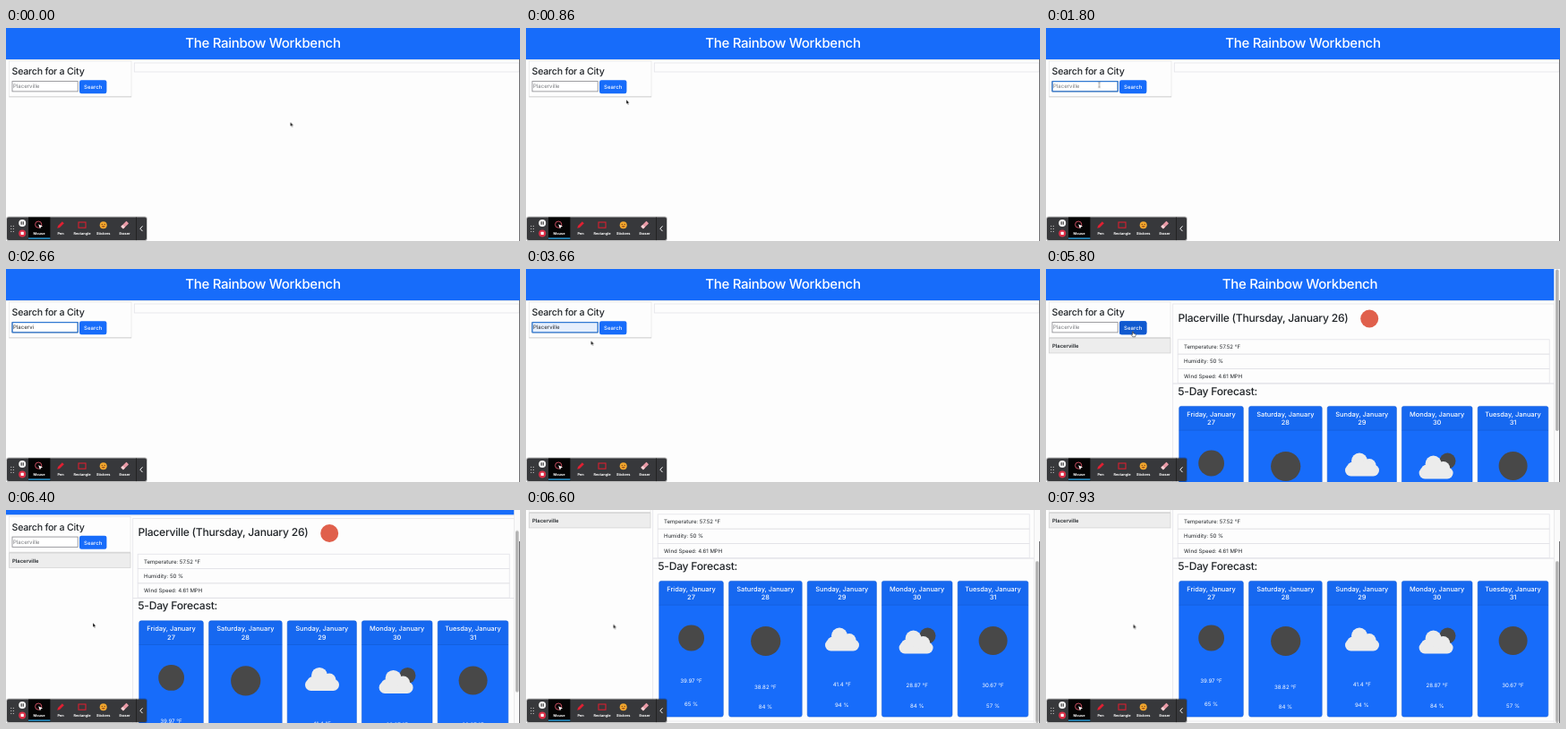
An HTML page that plays this animation: 574 px wide and 238 px high, repeating every 8000 ms.

```html
<!DOCTYPE html>
<html lang="en">
<head>
<meta charset="utf-8">
<title>Forecast page</title>
<style>
html, body { margin: 0; width: 100%; height: 100%; overflow: hidden; background: #fdfdfd; }
svg { display: block; width: 574px; height: 238px; }
text { font-family: Inter, Roboto, "Liberation Sans", sans-serif; fill: #212529; white-space: pre; text-rendering: geometricPrecision; }
.head { font-weight: 500; letter-spacing: -.02em; }
.mid { text-anchor: middle; }
.white { fill: #fff; }
.line { fill: none; stroke: #e3e3e8; stroke-width: .8; }

/* hard switches */
.wide, .tall, .empty, .weather, .history, .focus, .hint, .typed, .filled, .hover, .arrow, .beam, .hand {
  animation: 8s step-end infinite both;
}
.wide { animation-name: wide; }
.tall { animation-name: tall; }
.empty { animation-name: empty; }
.weather { animation-name: weather; }
.history { animation-name: history; }
.focus { animation-name: focus; }
.hint { animation-name: hint; }
.typed { animation-name: typed; }
.filled { animation-name: filled; }
.hover, .hand { animation-name: hover; }
.arrow { animation-name: arrow; }
.beam { animation-name: beam; }
@keyframes wide { 0% { opacity: 1 } 61.625%, 100% { opacity: 0 } }
@keyframes tall { 0% { opacity: 0 } 61.625%, 100% { opacity: 1 } }
@keyframes empty { 0% { opacity: 1 } 54.125%, 100% { opacity: 0 } }
@keyframes weather { 0% { opacity: 0 } 54.125%, 100% { opacity: 1 } }
@keyframes history { 0% { opacity: 0 } 52.5%, 100% { opacity: 1 } }
@keyframes focus { 0% { opacity: 0 } 21.625% { opacity: 1 } 52.5%, 100% { opacity: 0 } }
@keyframes hint { 0% { opacity: 1 } 27.5% { opacity: 0 } 52.5%, 100% { opacity: 1 } }
@keyframes typed { 0% { opacity: 0 } 27.5% { opacity: 1 } 52.5%, 100% { opacity: 0 } }
@keyframes filled { 0% { opacity: 0 } 42.5% { opacity: 1 } 52.5%, 100% { opacity: 0 } }
@keyframes hover { 0% { opacity: 0 } 50% { opacity: 1 } 74%, 100% { opacity: 0 } }
@keyframes arrow { 0% { opacity: 1 } 16.25% { opacity: 0 } 42.5% { opacity: 1 } 50% { opacity: 0 } 74%, 100% { opacity: 1 } }
@keyframes beam { 0% { opacity: 0 } 16.25% { opacity: 1 } 27.5% { opacity: 0 } 41.625% { opacity: 1 } 42.5%, 100% { opacity: 0 } }

.typed tspan { animation: letter 8s step-end infinite both; }
@keyframes letter { 0% { visibility: hidden } 27.5%, 100% { visibility: visible } }

/* motion */
.mouse { animation: mouse 8s ease-in-out infinite; }
@keyframes mouse {
  0%, .75% { transform: translate(317.5px, 105px) }
  10.75%, 11.625% { transform: translate(112px, 80px) }
  18.25%, 41.625% { transform: translate(59.5px, 63.5px) }
  45%, 46.5% { transform: translate(72.5px, 80px) }
  51.6%, 73.25% { transform: translate(97px, 70px) }
  77.5%, 81% { transform: translate(97px, 126px) }
  82.5%, 100% { transform: translate(97.5px, 127.5px) }
}
.scroll { animation: scroll 8s ease-in-out infinite; }
.thumb { animation: thumb 8s ease-in-out infinite; }
@keyframes scroll {
  0%, 78.05% { transform: translateY(0) }
  82.5%, 100% { transform: translateY(-74px) }
}
@keyframes thumb {
  0%, 78.05% { transform: translateY(0) }
  82.5%, 100% { transform: translateY(56.5px) }
}
</style>
</head>
<body>
<svg id="stage" viewBox="0 0 574 238"></svg>
<script>
const BLUE = '#176cfa', CITY = 'Placerville';

// Text placed by the middle of its capitals
const text = (s, x, y, size, cls = '', more = '') =>
  `<text x="${x}" y="${y + size * .36}" font-size="${size}" class="${cls}" ${more}>${s}</text>`;
const rect = (x, y, w, h, more = '') =>
  `<rect x="${x}" y="${y}" width="${w}" height="${h}" ${more}/>`;
const disc = (x, y, r, fill) => `<circle cx="${x}" cy="${y}" r="${r}" fill="${fill}"/>`;
const group = (cls, body) => `<g class="${cls}">${body}</g>`;
const box = (x, y, r, b) => rect(x, y, r - x, b - y, 'class="line"');

const letters = [...CITY].map((c, i) =>
  `<tspan style="animation-delay:${i * 65 + (i > 7 ? 80 : 0)}ms">${c}</tspan>`).join('');

const header = w =>
  rect(0, 0, 574, 35, `fill="${BLUE}"`) +
  rect(0, 35, 574, .8, 'fill="#dcdfe6"') +
  text('The Rainbow Workbench', w / 2, 16.3, 15, 'head mid white');

const form = right =>
  rect(3.5, 37, right - 3.5, 40, 'fill="#fdfdfd" stroke="#e6e6e6" stroke-width=".7"') +
  rect(3.5, 76.3, right - 3.5, 1, 'fill="#d3d3d3"') +
  text('Search for a City', 6.5, 48.4, 10.6, 'head') +
  rect(7, 59.6, 73.2, 11.3, 'fill="#fff" stroke="#85858a" stroke-width=".8"') +
  rect(82, 58.2, 30.4, 15, `rx="2.2" fill="${BLUE}"`) +
  rect(82, 58.2, 30.4, 15, 'rx="2.2" fill="#1059cf" class="hover"') +
  text('Search', 97.2, 66, 6, 'mid white', 'font-weight="500"');

const hint = text(CITY, 8, 65.3, 6.05, 'hint', 'style="fill:#77797d"');

const entry = right =>
  rect(3.4, 77.6, right - 3.4, 16.3, 'fill="#ededed" stroke="#d4d4d4" stroke-width=".8"') +
  text(CITY, 7, 86, 5.85, '', 'font-weight="600"');

const weather = (x, right) => {
  const rows = ['Temperature: 57.52 °F', 'Humidity: 50 %', 'Wind Speed: 4.61 MPH'];
  return box(x, 39, right, 128) +
    text(`${CITY} (Thursday, January 26)`, x + 5.7, 54.3, 12.1, 'head') +
    disc(x + 219.5, 55.5, 10, '#e0604c') +
    rows.map((s, i) =>
      box(x + 5.5, 78.8 + i * 16.3, right - 5.2, 95.1 + i * 16.3) +
      text(s, x + 12.3, 87 + i * 16.3, 6.05)).join('');
};

const cloud = (x, y) => `<g transform="translate(${x} ${y})" fill="#ececec">` +
  rect(-19, 0, 38, 13, 'rx="6.5"') +
  '<circle cx="-3" cy="-4" r="9"/><circle cx="8" cy="1" r="7.5"/><circle cx="-10" cy="4" r="7"/></g>';
const moon = (x, y, r) => disc(x, y, r, '#484848');

const days = [
  { day: 'Friday, January', n: 27, x: 148.7, w: 71.6, temp: '39.97', wet: 65, ty: 265, wy: 290.5, icon: moon(184.6, 217, 14.4) },
  { day: 'Saturday, January', n: 28, x: 226.6, w: 81.6, temp: '38.82', wet: 84, ty: 271.5, wy: 294, icon: moon(267.7, 220.5, 16.6) },
  { day: 'Sunday, January', n: 29, x: 314.2, w: 77.2, temp: '41.4', wet: 94, ty: 268.5, wy: 292, icon: cloud(353, 218.5) },
  { day: 'Monday, January', n: 30, x: 397.4, w: 78.6, temp: '28.87', wet: 84, ty: 269.5, wy: 293, icon: moon(448.5, 214.5, 9) + cloud(435.6, 221.5) },
  { day: 'Tuesday, January', n: 31, x: 482.2, w: 78.6, temp: '30.67', wet: 57, ty: 269.5, wy: 293, icon: moon(521.6, 220, 16) }
];

const card = d => {
  const c = d.x + d.w / 2;
  return rect(d.x, 153.4, d.w, 151.6, `rx="2.2" fill="${BLUE}" stroke="#1660dc" stroke-width=".6"`) +
    rect(d.x, 153.4, d.w, 26.6, 'rx="2" fill="#000" fill-opacity=".04"') +
    rect(d.x, 179.8, d.w, .6, 'fill="#1259d0"') +
    text(d.day, c, 162, 7.4, 'mid white', 'font-weight="500"') +
    text(d.n, c, 171.6, 7.4, 'mid white', 'font-weight="500"') +
    d.icon +
    text(d.temp + ' °F', c, d.ty, 6.1, 'mid white') +
    text(d.wet + ' %', c, d.wy, 6.1, 'mid white');
};

const wide = header(574) + form(140) +
  group('filled', rect(7, 59.6, 73.2, 11.3, 'fill="#e6effd"')) +
  group('focus', rect(7, 59.6, 73.2, 11.3, 'rx=".6" fill="none" stroke="#2f78d2" stroke-width="1.3"')) +
  hint + text(letters, 8, 65.3, 6.05, 'typed') +
  group('history', entry(140)) +
  group('empty', box(143.3, 39, 573, 49)) +
  group('weather', weather(143.3, 573) + box(143.3, 128, 573, 138));

const tall = group('scroll',
    header(567) + form(139) + hint + entry(139) +
    weather(141.7, 567.4) + box(141.7, 128, 567.4, 310) +
    text('5-Day Forecast:', 147.3, 136.4, 12.1, 'head') +
    days.map(card).join('')) +
  rect(567.5, 0, 6.5, 238, 'fill="#fafafa"') +
  rect(567.4, 0, .6, 238, 'fill="#e6e6e6"') +
  group('thumb', rect(569, .5, 3.6, 180.5, 'rx="1.8" fill="#b4b4b4"'));

const tool = (name, x, icon) =>
  `<g transform="translate(${x} 220)">${icon}</g>` +
  text(name, x, 229.2, 3.9, 'mid white', 'font-weight="700"');

const dots = [5.8, 8.4].map(x => [221.3, 224.3, 227.3].map(y => disc(x, y, .65, '#c8c8c8')).join('')).join('');

const toolbar =
  rect(.2, 210.4, 157.6, 27.6, 'rx="2.8" fill="#000" fill-opacity=".25"') +
  rect(1, 211.5, 156, 25.6, 'rx="2" fill="#37383b"') +
  rect(25, 211.5, 24.4, 25, 'fill="#050505"') +
  rect(25, 234.4, 24.4, 1.4, 'fill="#2ba3e0"') +
  rect(145, 211.5, .8, 25.6, 'fill="#1d1d1f"') + dots +
  disc(18.2, 218, 4, '#f4f4f4') +
  rect(16.6, 216.3, 1.1, 3.4, 'fill="#333"') + rect(18.7, 216.3, 1.1, 3.4, 'fill="#333"') +
  disc(18.2, 229.4, 4, '#dc2f48') + rect(16.6, 227.8, 3.2, 3.2, 'rx=".5" fill="#fff"') +
  tool('Mouse', 37, '<circle cx="-.8" cy="-.4" r="3.6" fill="none" stroke="#e0566a" stroke-width=".9"/>' +
    '<path d="M-.8-.8L4 1.4 1.9 2.2 1 4.4Z" fill="#fff"/>') +
  tool('Pen', 61, '<path d="M-3.8 3.8L-2.9 1 1.8-3.7 3.8-1.7-1 3Z" fill="#df2032"/>') +
  tool('Rectangle', 85, rect(-4, -3, 8, 6.2, 'fill="none" stroke="#d81f30" stroke-width="1.1"')) +
  tool('Stickers', 108.7, disc(0, .2, 4, '#f3a72e') + disc(-1.4, -.6, .6, '#6a3b10') + disc(1.4, -.6, .6, '#6a3b10') +
    '<path d="M-2 1.2Q0 3.8 2 1.2Z" fill="#8a3a14"/>') +
  tool('Eraser', 132.6, `<g transform="rotate(-45)">${rect(-4.4, -1.8, 8.8, 3.8, 'rx=".6" fill="#e99aa6"')}` +
    `${rect(-4.4, -1.8, 3, 3.8, 'rx=".6" fill="#f5d3d6"')}</g>`) +
  '<path d="M152.5 221.3L149.8 224.2 152.5 227.1" fill="none" stroke="#fff" stroke-width="1"/>';

const mouse = group('mouse',
  '<path class="arrow" d="M0 0V5L1.1 4 1.9 5.8 2.8 5.4 2 3.7H3.5Z" fill="#111" stroke="#fff" stroke-width=".4"/>' +
  '<path class="beam" d="M-1.2-3Q0-3 0-2Q0-3 1.2-3M0-2V2M-1.2 3Q0 3 0 2Q0 3 1.2 3" fill="none" stroke="#555" stroke-width=".6"/>' +
  '<path class="hand" d="M-.5 0Q.1-.6.6 0V2L2.8 2.5Q3.4 2.7 3.2 3.6L2.6 5.8H-.2L-1.8 3.6Q-1.6 2.8-.5 3.6Z" fill="#fff" stroke="#111" stroke-width=".5"/>');

document.getElementById('stage').innerHTML =
  group('wide', wide) + group('tall', tall) +
  rect(573.2, 35, .8, 203, 'fill="#4a4a4e"') + toolbar + mouse;
</script>
</body>
</html>
```
